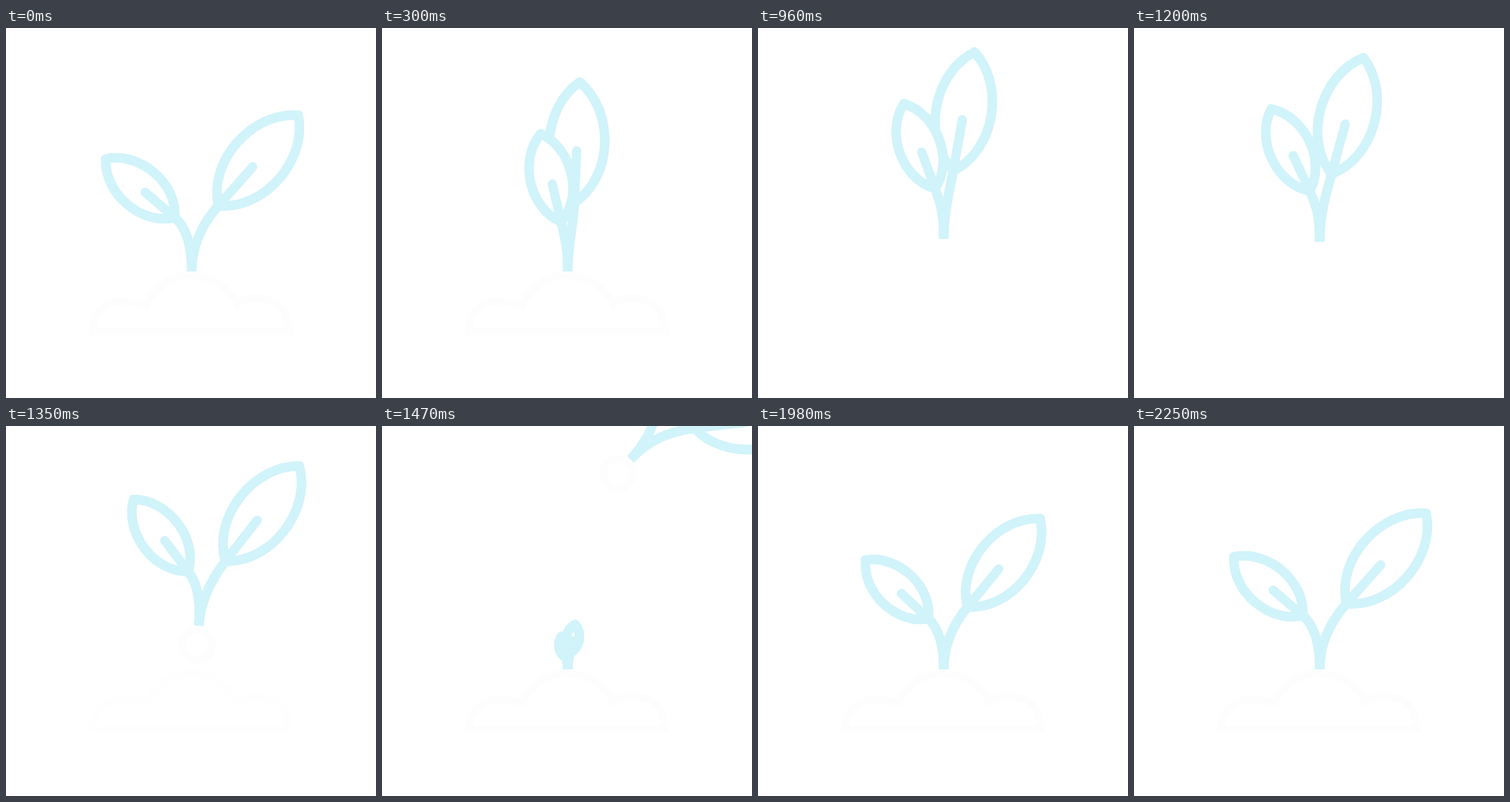
Recreate the animation shown at these times as an HTML page. Size 500 by 500 pixels, loop 2730 ms.

```html
<!DOCTYPE html>
<html lang="en">
<head>
<meta charset="utf-8">
<title>Sprout</title>
<style>
  html, body { margin: 0; width: 100%; height: 100%; overflow: hidden; background: #fff; }
  svg { display: block; width: 100vw; height: 100vh; }
  .plant path { stroke: #d1f3fa; stroke-width: 13; stroke-linejoin: round; fill: none; }
  .plant .leaf { fill: #fff; }
  .plant .vein { stroke-linecap: round; stroke-width: 12.5; }
  .soil { fill: #fff; stroke: #fdfdfd; stroke-width: 10; }
</style>
</head>
<body>
<svg viewBox="0 0 500 500">
  <g id="old" class="plant"></g>
  <circle id="bulb" class="soil" r="20"/>
  <circle id="drop" r="9" fill="#fff"/>
  <path id="mound" class="soil" d="M117 410C118 382 140 366 162 370Q178 371 190 374C202 347 225 334 250 334C278 334 300 350 313 373C324 364 340 364 352 367C372 371 382 388 383 410Z"/>
  <g id="young" class="plant"></g>
</svg>
<script>
const LOOP = 2730, STEP = 30, END = 2250;
const $ = id => document.getElementById(id);
const clamp = v => Math.max(0, Math.min(1, v));
const smooth = p => p * p * (3 - 2 * p);
const linear = p => p;
const speedUp = p => p * p;

// Each key is [time, value, easing into this key].
function track(keys, t) {
  if (t <= keys[0][0]) return keys[0][1];
  for (let i = 1; i < keys.length; i++) {
    const [t1, v1, ease = smooth] = keys[i];
    if (t <= t1) {
      const [t0, v0] = keys[i - 1];
      return v0 + (v1 - v0) * ease((t - t0) / (t1 - t0));
    }
  }
  return keys[keys.length - 1][1];
}

const OPEN = [[0, 1], [300, 0], [690, .17, linear], [840, .2], [1080, .19], [1200, .33], [1440, 1]];
const ROOT_X = [[1290, 251], [1470, 336, speedUp], [1590, 500, linear]];
const ROOT_Y = [[330, 329], [600, 265], [850, 300], [1090, 266], [1200, 289, linear],
  [1290, 298], [1470, 45, speedUp], [1590, -300, linear]];
const TILT = [[1290, 0], [1470, 42, speedUp], [1590, 76, linear]];

// Leaf angles, folded and fully open.
const RIGHT = { fold: 2.5, full: 41.5 };
const LEFT = { fold: -13, full: -49.6 };
const angleAt = (side, open) => side.fold + (side.full - side.fold) * open;

function branch(side, deg, size) {
  const right = side === RIGHT;
  const open = (deg - side.fold) / (side.full - side.fold);
  const bx = (right ? 9 + 18 * open + 9 * open * open : -9 - 14 * open) * size;
  const by = (right ? -93 + 4 * open : -67 - 6 * open) * size;
  const k = (right ? 1 : .75) * size;
  const a = deg * Math.PI / 180;
  const pull = (right ? 30 : 20) * size;
  const cx = bx - Math.sin(a) * pull, cy = by + Math.cos(a) * pull;
  const n = v => (v * k).toFixed(2);
  return `<g transform="translate(${bx} ${by}) rotate(${deg})">
    <path class="leaf" d="M0 0C${n(-50)} ${n(-36)} ${n(-50)} ${n(-125)} 0 ${n(-163)}C${n(50)} ${n(-125)} ${n(50)} ${n(-36)} 0 0Z"/>
    <path class="vein" d="M0 0V${n(-70)}"/></g>
    <path d="M${bx} ${by}C${cx} ${cy} 0 ${-36 * size} 0 0"/>`;
}

function plant(el, x, y, tilt, size, angle) {
  el.setAttribute("transform", `translate(${x} ${y}) rotate(${tilt})`);
  el.innerHTML = [RIGHT, LEFT].map(side => branch(side, angle(side), size)).join("");
}

const show = (el, on) => el.style.display = on ? "" : "none";

function draw(ms) {
  const t = Math.min(END, Math.floor(ms % LOOP / STEP) * STEP);

  const x = track(ROOT_X, t), y = track(ROOT_Y, t), tilt = track(TILT, t);
  const open = track(OPEN, t);
  show($("old"), t < 1620);
  plant($("old"), x, y, tilt, 1, side => angleAt(side, open));

  const a = tilt * Math.PI / 180;
  show($("bulb"), t > 330 && t < 1620);
  $("bulb").setAttribute("cx", x - Math.sin(a) * 26);
  $("bulb").setAttribute("cy", y + Math.cos(a) * 26);
  $("bulb").style.stroke = t < 1320 ? "#fff" : "";

  show($("drop"), t >= 660 && t <= 750);
  $("drop").setAttribute("cx", 234 - (t - 690) * .1);
  $("drop").setAttribute("cy", 212 + (t - 690) * .3);

  // The new sprout unfolds in step with its growth.
  const size = 1 - (1 - clamp((t - 1380) / (END - 1380))) ** 2.52;
  show($("young"), size > 0);
  plant($("young"), 251, 329, 0, size, side => side.full * size);

  $("mound").style.opacity = t < 1000
    ? 1 - clamp((t - 330) / 210)
    : clamp((t - 1320) / 120);
}

const start = performance.now();
function tick() {
  draw(performance.now() - start);
  requestAnimationFrame(tick);
}
tick();
</script>
</body>
</html>
```
